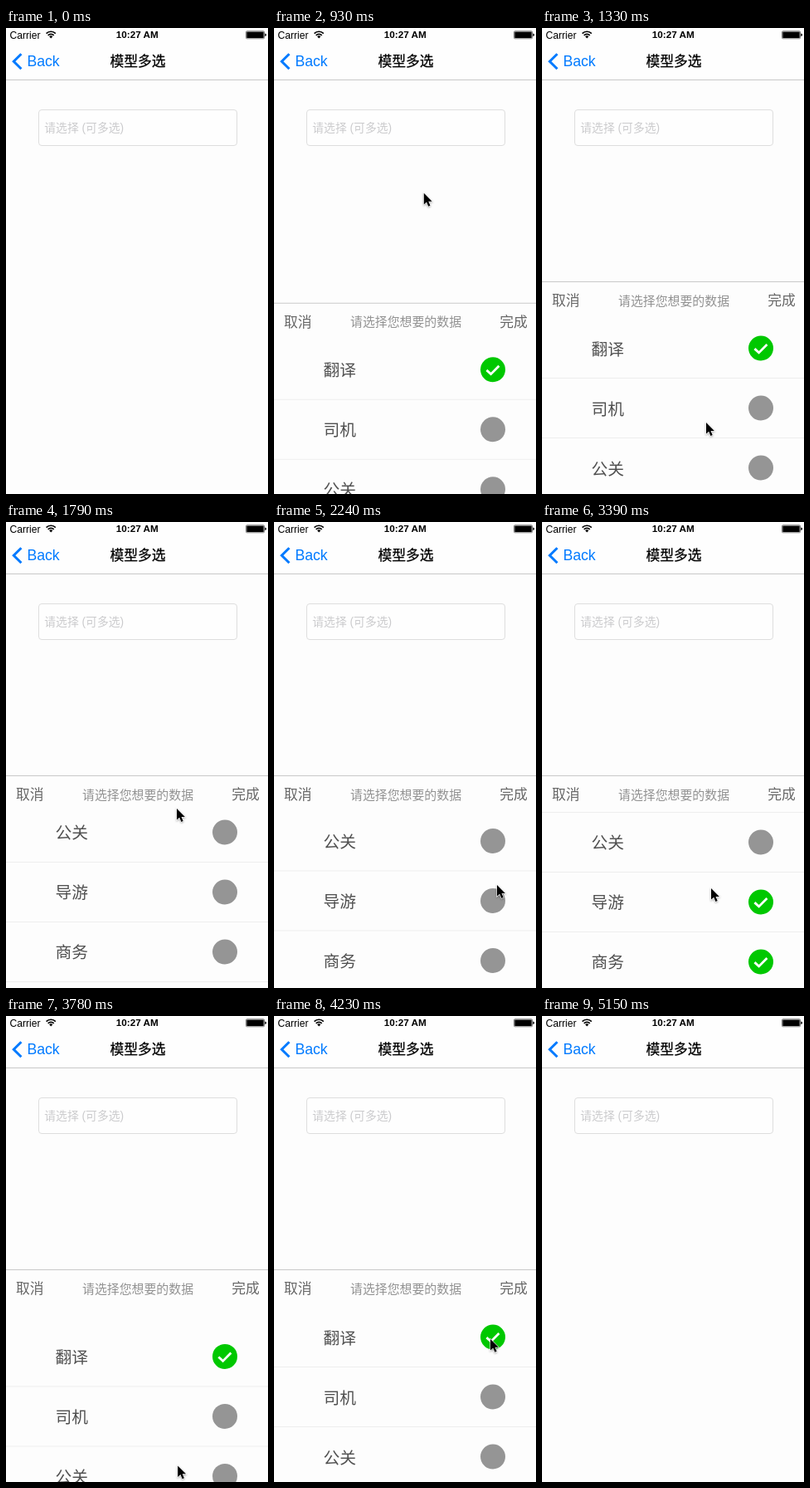
Recreate the animation shown at these times as an HTML page. Size 316 by 561 pixels, loop 5.42 s.

```html
<!DOCTYPE html>
<html lang="zh-CN">
<head>
<meta charset="utf-8">
<title>模型多选</title>
<style>
html, body { margin: 0; width: 100%; height: 100%; overflow: hidden; background: #fdfdfd; }
svg { display: block; width: 100%; height: 100%; }
text { font: 16.8px "Liberation Sans", "Noto Sans CJK SC", "Noto Sans CJK", sans-serif; }
.status { font-size: 12.1px; }
.time { font-size: 11.7px; font-weight: bold; }
.back { font-size: 17.7px; fill: #007aff; }
.title { font-weight: 500; stroke: #000; stroke-width: .25; }
.hint { font-size: 13.8px; fill: #cbcbcd; }
.action { fill: #666; }
.prompt { font-size: 14.9px; fill: #929292; }
.label { font-size: 19.75px; font-weight: 300; fill: #505050; }
.line { fill: none; stroke: #c9c9c9; }
</style>
</head>
<body>
<svg viewBox="0 0 316 561">
  <clipPath id="list"><rect y="349" width="316" height="213"/></clipPath>
  <rect width="316" height="62" fill="#fefefe"/>
  <path class="line" d="M0 62.5H316"/>

  <text class="status" x="4.6" y="12.5">Carrier</text>
  <g fill="none" stroke="#000" stroke-width="1.7">
    <path d="M48.6 6.6a7.8 7.8 0 0 1 11.2 0M50.7 8.8a4.9 4.9 0 0 1 7 0"/>
    <path d="M54.2 12.4l-2.1-2.1a3 3 0 0 1 4.2 0z" fill="#000" stroke="none"/>
  </g>
  <text class="time" x="132.8" y="12.3">10:27 AM</text>
  <rect x="289.5" y="3.8" width="22" height="9" rx="1" fill="#fff" stroke="#777"/>
  <rect x="290.3" y="4.6" width="20.4" height="7.4"/>
  <path d="M312.3 6.6q1.7 .3 1.7 1.7t-1.7 1.7z"/>

  <path d="M18.4 31.2L9.3 40.2l9.1 9.1" fill="none" stroke="#007aff" stroke-width="3"/>
  <text class="back" x="25.4" y="46.2">Back</text>
  <text class="title" x="125.5" y="46.3">模型多选</text>

  <rect x="39.5" y="98.5" width="239" height="43" rx="3.5" fill="#fefefe" stroke="#dedede"/>
  <text class="hint" x="46.3" y="124.7">请选择 (可多选)</text>

  <g id="sheet">
    <rect y="305" width="316" height="257" fill="#fdfdfd"/>
    <g clip-path="url(#list)"><g id="rows"></g></g>
    <path class="line" d="M0 305.5H316"/>
    <text class="action" x="12" y="333.8">取消</text>
    <text class="prompt" x="92" y="333.5">请选择您想要的数据</text>
    <text class="action" x="272.3" y="333.8">完成</text>
  </g>

  <path id="cursor" d="M0 0V13.6l3.2-2.9 2.2 5.2 2.3-1-2.2-5h4.4z" stroke="#fff" stroke-width="1.2" paint-order="stroke" style="filter:drop-shadow(0 1px 1px #0005)"/>
</svg>

<script>
const LOOP = 5420, STEP = 57, FIRST = 300;
const LIST_TOP = 349.5, ROW = 72, SHEET_HEIGHT = 257;
const SCROLL_END = 2 * ROW, OVERSHOOT = 25, FLICK = 400, SETTLE = 138;
const items = ['翻译', '司机', '公关', '导游', '商务'];
const checkedFrom = { 翻译: 0, 导游: 2760, 商务: 3040 };

// Mouse strokes: when each begins and ends, and where it leads.
const entry = { x: 325, y: 330 };
const strokes = [
  { from: 270, to: 640, x: 176, y: 122 },   // tap the field
  { from: 755, to: 1326, x: 198, y: 475 },  // reach the list
  { from: 1440, to: 1780, x: 206, y: 345 }, // drag up
  { from: 1960, to: 2238, x: 269, y: 437 },
  { from: 2240, to: 2560, x: 239, y: 458 }, // tap the second row
  { from: 2760, to: 3000, x: 236, y: 539 }, // tap the third row
  { from: 3060, to: 3378, x: 204, y: 441 },
  { from: 3380, to: 3700, x: 207, y: 542 }, // drag down
  { from: 3760, to: 4224, x: 261, y: 389 },
  { from: 4230, to: 4420, x: 275, y: 326 }, // tap done
  { from: 4900, to: 5140, x: 330, y: 575 }
];

function ease(t, from, to) {
  const p = Math.min(1, Math.max(0, (t - from) / (to - from)));
  return p * p * (3 - 2 * p);
}

function cursorAt(t) {
  return strokes.reduce((pos, { from, to, x, y }) => {
    const p = ease(t, from, to);
    return { x: pos.x + (x - pos.x) * p, y: pos.y + (y - pos.y) * p };
  }, entry);
}

// A flick runs past the end of the list, then settles back.
function flick(t, start) {
  const settled = start + FLICK;
  if (t < settled) return (SCROLL_END + OVERSHOOT) * ease(t, start, settled);
  return SCROLL_END + OVERSHOOT * Math.exp((settled - t) / SETTLE);
}

const sheet = document.getElementById('sheet');
const rows = document.getElementById('rows');
const cursor = document.getElementById('cursor');
const move = (node, x, y) => node.setAttribute('transform', `translate(${x} ${y})`);

rows.innerHTML = items.map((name, i) => `
  <g transform="translate(0 ${LIST_TOP + i * ROW})">
    <text class="label" x="59.6" y="44">${name}</text>
    <circle cx="264" cy="36" r="15"/>
    <path class="tick" d="M256.4 36.6l5.2 4.8 9.8-9.9" fill="none" stroke="#fff" stroke-width="2.8"/>
    <path d="M0 72H316" stroke="#eee"/>
  </g>`).join('');
const dots = rows.querySelectorAll('circle');
const ticks = rows.querySelectorAll('.tick');

function draw(time) {
  // The picture advances in even steps, like a screen recording.
  const t = FIRST + STEP * Math.floor((time - FIRST + 4) / STEP);
  const shown = ease(t, 726, 976) - ease(t, 4932, 5145);
  const { x, y } = cursorAt(t);
  move(sheet, 0, (1 - shown) * SHEET_HEIGHT);
  move(rows, 0, flick(t, 3390) - flick(t, 1450));
  move(cursor, x, y);
  items.forEach((name, i) => {
    const checked = time >= checkedFrom[name];
    dots[i].setAttribute('fill', checked ? '#00c800' : '#959595');
    ticks[i].style.display = checked ? '' : 'none';
  });
}

const start = performance.now();
function tick() {
  draw((performance.now() - start) % LOOP);
  requestAnimationFrame(tick);
}
tick();
</script>
</body>
</html>
```
